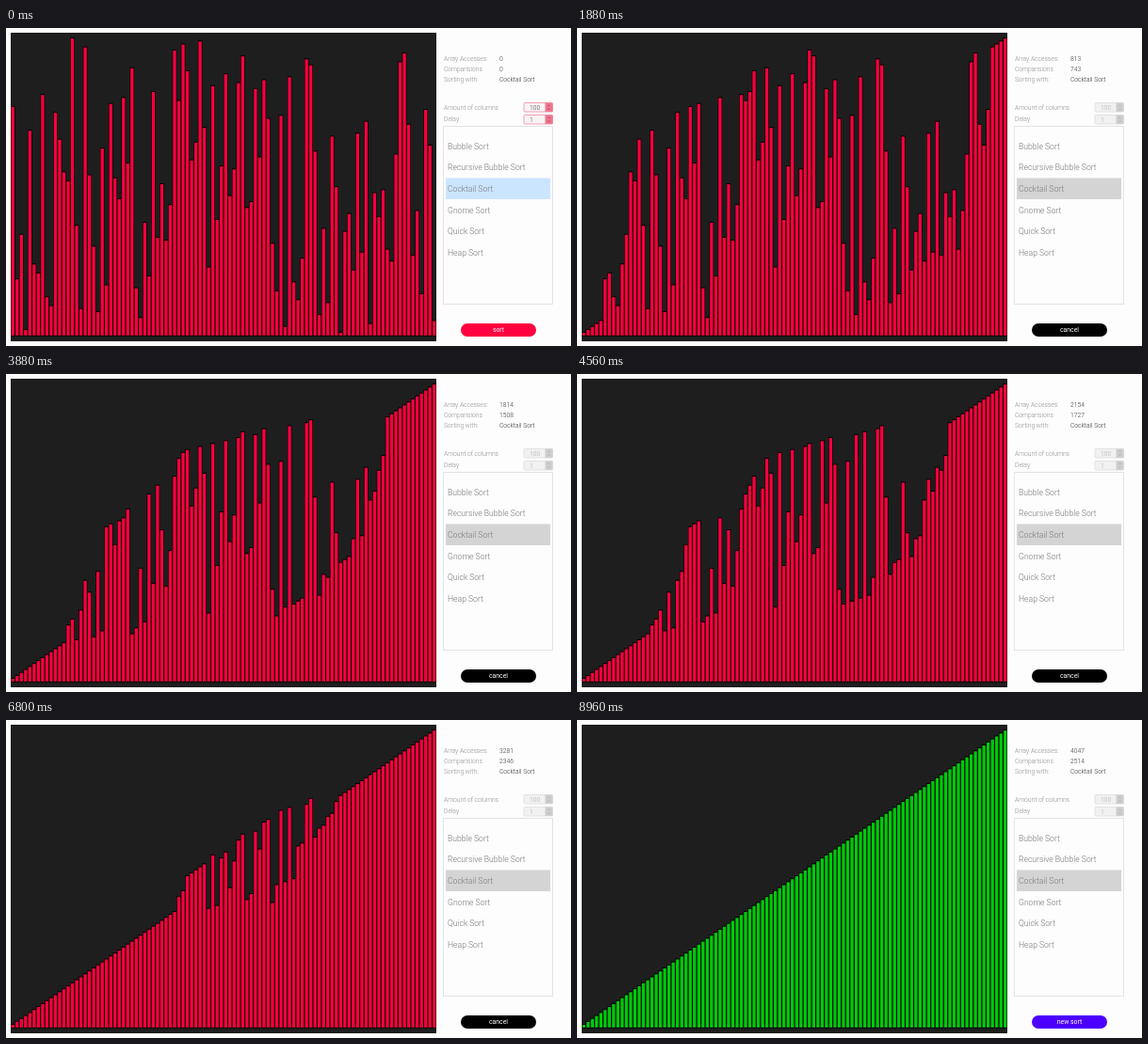
An HTML page with a canvas that plays this animation: 600x338 px, repeating every 9.32 s.

```html
<!DOCTYPE html>
<html lang="en">
<head>
<meta charset="utf-8">
<title>Cocktail sort</title>
<style>
  html, body { margin: 0; width: 100%; height: 100%; overflow: hidden; background: #fdfdfd; }
  canvas, svg { position: absolute; left: 0; top: 0; width: 600px; height: 338px; }
  text { font: 300 6.7px Roboto, sans-serif; fill: #8c8c8c; }
  .value { fill: #333; }
  .item { font-size: 8.6px; fill: #777; }
  .row { fill: #d4d4d4; }
  .list { fill: none; stroke: #e3e3e3; }
  .field { fill: #f1f1f1; stroke: #e2e2e2; }
  .arrows { fill: #cfcfcf; }
  .number { fill: #aaa; }
  .mark { fill: none; stroke: #aaa; stroke-width: .7; }
  .idle .row { fill: #cce5ff; }
  .idle .field { fill: #f7f3f4; stroke: #f0a0b2; }
  .idle .arrows { fill: #ee7890; }
  .idle .number { fill: #444; }
  .idle .mark { stroke: #b03050; }
  #label { font-weight: 400; font-size: 6.9px; fill: #fff; text-anchor: middle; }
</style>
</head>
<body>
<canvas id="bars" width="600" height="338"></canvas>
<svg id="panel" viewBox="0 0 600 338">
  <text x="465" y="35">Array Accesses:</text>
  <text x="465" y="45.8">Comparisions</text>
  <text x="465" y="56.6">Sorting with:</text>
  <text id="accesses" class="value" x="524" y="35"></text>
  <text id="swaps" class="value" x="524" y="45.8"></text>
  <text class="value" x="524" y="56.6">Cocktail Sort</text>
  <text x="465" y="86.6">Amount of columns</text>
  <text x="465" y="99.4">Delay</text>
  <g id="fields"></g>
  <rect class="list" x="464.5" y="104.5" width="116" height="189"/>
  <rect class="row" x="467" y="159.5" width="111" height="22.5"/>
  <g id="items"></g>
  <rect id="button" x="483" y="314" width="80" height="14" rx="7"/>
  <text id="label" x="523" y="323.3"></text>
</svg>
<script>
const LOOP = 9320, TICK = 40;
const SORT_START = 254, SORT_END = 8332, BAR_TIME = 6, FADE = 600;
const COUNT = 100, PITCH = 4.52, UNIT = 3.16, LEFT = 5, BASE = 327;
const RED = [255, 0, 64], BLACK = [0, 0, 0], BLUE = [75, 0, 255];

const START = [
  77, 19, 34, 2, 69, 24, 21, 81, 13, 10, 75, 66, 55, 52, 100, 37, 9, 97, 54, 30,
  8, 63, 17, 78, 53, 46, 80, 58, 90, 16, 6, 38, 20, 82, 33, 51, 32, 44, 96, 79,
  98, 89, 59, 65, 99, 70, 23, 84, 39, 57, 88, 47, 56, 85, 94, 43, 45, 83, 60, 86,
  73, 31, 15, 74, 3, 87, 18, 12, 26, 93, 91, 62, 7, 36, 11, 67, 50, 1, 35, 41,
  22, 68, 28, 72, 4, 48, 40, 49, 29, 25, 61, 92, 95, 71, 27, 42, 14, 76, 64, 5
];

// Time in ms and steps done by then.
const PACE = [[SORT_START, 0], [1880, 813], [3080, 1413], [3880, 1814],
  [5280, 2514], [6800, 3281], [SORT_END, 4047]];

const byId = id => document.getElementById(id);
const ctx = byId('bars').getContext('2d');
const clamp = x => Math.max(0, Math.min(1, x));

byId('items').innerHTML =
  ['Bubble Sort', 'Recursive Bubble Sort', 'Cocktail Sort', 'Gnome Sort', 'Quick Sort', 'Heap Sort']
    .map((name, i) => `<text class="item" x="469" y="${128.8 + i * 22.6}">${name}</text>`).join('');

byId('fields').innerHTML = [['100', 79.5], ['1', 92.5]].map(([n, y]) => `
  <rect class="field" x="550" y="${y}" width="30.5" height="9.5" rx="1"/>
  <rect class="arrows" x="572.5" y="${y}" width="8" height="9.5"/>
  <path class="mark" d="M575 ${y + 3.8}l1.5-1.6 1.5 1.6m-3 2l1.5 1.6 1.5-1.6"/>
  <text class="number" x="556" y="${y + 7.2}">${n}</text>`).join('');

function stepsAt(t) {
  if (t <= SORT_START) return 0;
  for (let i = 1; i < PACE.length; i++) {
    const [t0, n0] = PACE[i - 1], [t1, n1] = PACE[i];
    if (t <= t1) return Math.round(n0 + (n1 - n0) * (t - t0) / (t1 - t0));
  }
  return PACE[PACE.length - 1][1];
}

function cocktailSort(limit) {
  const values = START.slice();
  let lo = 0, hi = COUNT - 1, steps = 0, swaps = 0, forward = true, moved = true;
  while (moved && steps < limit) {
    moved = false;
    for (let k = 0; k < hi - lo && steps < limit; k++, steps++) {
      const i = forward ? lo + k : hi - 1 - k;
      if (values[i] > values[i + 1]) {
        [values[i], values[i + 1]] = [values[i + 1], values[i]];
        swaps++;
        moved = true;
      }
    }
    if (forward) hi--; else lo++;
    forward = !forward;
    if (steps >= limit) break;
  }
  return { values, steps, swaps };
}

function drawBars(values, greenCount) {
  ctx.fillStyle = '#fdfdfd';
  ctx.fillRect(0, 0, 600, 338);
  ctx.fillStyle = '#1e1e1e';
  ctx.fillRect(LEFT, 5, 452, 328);
  values.forEach((v, i) => {
    const x = LEFT + i * PITCH, h = v * UNIT;
    ctx.fillStyle = '#000';
    ctx.fillRect(x, BASE - h - 0.8, PITCH, h + 1.4);
    ctx.fillStyle = i < greenCount ? '#00c80a' : '#f8003e';
    ctx.fillRect(x + 0.6, BASE - h + 0.2, PITCH - 1.2, h - 0.4);
  });
}

function mix(a, b, p) {
  const s = p * p * (3 - 2 * p);
  return `rgb(${a.map((c, i) => Math.round(c + (b[i] - c) * s))})`;
}

function drawButton(t) {
  const done = t >= SORT_END;
  byId('label').textContent = t < SORT_START ? 'sort' : done ? 'new sort' : 'cancel';
  byId('button').style.fill = done
    ? mix(BLACK, BLUE, clamp((t - SORT_END) / FADE))
    : mix(RED, BLACK, clamp((t - SORT_START) / FADE));
}

function render(now) {
  const t = Math.min(8960, Math.floor((now % LOOP) / TICK) * TICK);
  const { values, steps, swaps } = cocktailSort(stepsAt(t));
  drawBars(values, Math.floor((t - SORT_END) / BAR_TIME));
  byId('accesses').textContent = steps;
  byId('swaps').textContent = swaps;
  byId('panel').classList.toggle('idle', t < SORT_START);
  drawButton(t);
}

const begin = performance.now();
function frame() {
  render(performance.now() - begin);
  requestAnimationFrame(frame);
}
frame();
</script>
</body>
</html>
```
